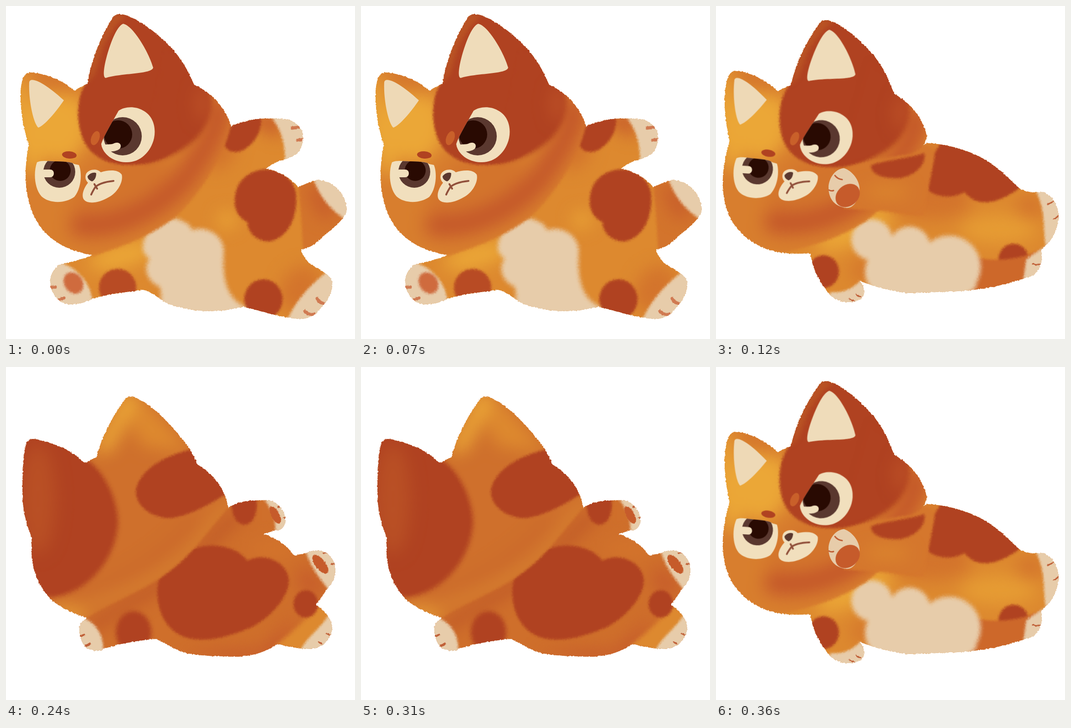
An HTML page that plays this animation: 766 by 731 pixels, repeating every 480 ms.

```html
<!DOCTYPE html>
<html lang="en">
<head>
<meta charset="utf-8">
<title>Tumbling kitten</title>
<style>
  html, body { margin: 0; width: 100%; height: 100%; overflow: hidden; background: #fff; }
  svg { display: block; width: 766px; height: 731px; }
  .pose { visibility: hidden; }
  .pose.on { visibility: visible; }
  .crisp { filter: blur(.7px); }
  .soft { filter: blur(2.5px); }
  .mid { filter: blur(5px); }
  .wash { filter: blur(18px); }
  .rust { fill: #b04221; }
  .clay { fill: #c65b2b; }
  .orange { fill: #d3742c; }
  .amber { fill: #dd892f; }
  .gold { fill: #eba737; }
  .cream { fill: #e7ccaa; }
  .ivory { fill: #f1dfbd; }
  .iris { fill: #5a382f; }
  .pupil { fill: #290a02; }
  .line { fill: none; stroke-linecap: round; stroke-linejoin: round; }
  .toes { stroke: #d07a52; stroke-width: 7; }
  .claws { stroke: #c06038; stroke-width: 3; }
</style>
</head>
<body>
<svg viewBox="0 0 766 731">
  <defs>
    <filter id="rough" filterUnits="userSpaceOnUse" x="0" y="0" width="766" height="731" color-interpolation-filters="sRGB">
      <feTurbulence type="fractalNoise" baseFrequency=".25" numOctaves="2" seed="4"/>
      <feColorMatrix values="1 0 0 0 0  0 1 0 0 0  0 0 1 0 0  0 0 0 0 1" result="noise"/>
      <feDisplacementMap in="SourceGraphic" in2="noise" scale="4" xChannelSelector="R" yChannelSelector="G"/>
    </filter>

    <path id="headOutline" d="M50 305C42 280 31 235 32 195C33 165 38 146 55 146C85 148 120 160 150 186L179 170C186 130 200 80 235 24C243 15 258 17 275 25C310 42 345 72 365 94C390 122 403 150 413 173C450 190 482 222 494 264C475 340 420 420 370 465C310 510 250 530 190 547C135 538 100 515 78 488C45 445 35 380 50 305Z"/>
    <path id="headArea" d="M510 -20V240L494 264C475 340 420 420 370 465C310 510 250 530 190 549H-40V-20Z"/>
    <path id="bigEye" d="M247 230C260 221 282 219 300 229C322 240 330 265 325 290C318 322 292 345 262 343C235 342 212 325 209 303C215 285 235 252 247 230Z"/>
    <path id="smallEye" d="M68 343C80 338 90 341 108 341C125 342 142 341 150 347L160 349C167 365 166 400 150 419C130 434 95 434 78 418C62 400 60 365 68 343Z"/>
    <clipPath id="headClip"><use href="#headArea"/></clipPath>
    <clipPath id="bigEyeClip"><use href="#bigEye"/></clipPath>
    <clipPath id="smallEyeClip"><use href="#smallEye"/></clipPath>

    <g id="head" class="soft"><g clip-path="url(#headClip)">
      <use href="#headArea" fill="#d87e2e"/>
      <g class="wash">
        <ellipse class="gold" cx="118" cy="262" rx="65" ry="80"/>
        <ellipse class="gold" cx="35" cy="235" rx="20" ry="90"/>
        <ellipse class="gold" cx="58" cy="325" rx="22" ry="50"/>
        <ellipse class="orange" cx="250" cy="400" rx="120" ry="65" transform="rotate(-30 250 400)"/>
        <ellipse class="orange" cx="108" cy="168" rx="40" ry="18" transform="rotate(35 108 168)"/>
        <path class="line" stroke="#c4582a" stroke-width="50" d="M165 482C250 490 345 440 395 375C435 320 465 270 470 225"/>
      </g>
      <path class="rust" d="M179 165C151 200 154 262 171 297C189 332 225 349 270 349C340 350 390 314 417 272C437 235 428 195 413 165L440 -10H190Z"/>
      <path class="rust mid" d="M300 345C370 335 420 300 438 262C455 230 452 205 445 165L350 100Z"/>
      <path class="mid" fill="#b95324" d="M180 170L190 90L235 15L265 20L240 45L215 85L195 150Z"/>
      <ellipse class="wash" fill="#bd5127" cx="432" cy="215" rx="16" ry="40"/>
    </g></g>

    <g id="face" class="crisp">
      <path fill="#eed9b6" d="M51 167C53 155 80 164 127 207C110 232 85 262 71 267C60 258 49 205 51 167Z"/>
      <path fill="#efdcba" d="M257 39C278 42 313 100 323 135C322 150 252 147 219 158C211 157 216 130 220 115C228 85 242 45 257 39Z"/>
      <ellipse class="rust" cx="139" cy="327" rx="16" ry="8" transform="rotate(5 139 327)"/>
      <ellipse fill="#c9602a" cx="196" cy="290" rx="9" ry="16" transform="rotate(20 196 290)"/>
      <use href="#bigEye" class="ivory"/>
      <g clip-path="url(#bigEyeClip)">
        <circle class="iris" cx="256" cy="286" r="42"/>
        <circle class="pupil" cx="246" cy="282" r="31"/>
        <path class="ivory" d="M209 308C218 301 230 306 238 301C250 297 255 306 250 313C242 320 229 321 216 316Z"/>
      </g>
      <use href="#smallEye" class="ivory"/>
      <g clip-path="url(#smallEyeClip)">
        <circle class="iris" cx="117" cy="364" r="35"/>
        <circle class="pupil" cx="119" cy="361" r="23"/>
        <rect class="ivory" x="76" y="359" width="29" height="17" rx="8"/>
      </g>
      <path class="ivory" d="M176 368C182 358 200 356 208 365C225 360 245 358 254 370C258 385 245 410 225 420C205 432 180 436 171 425C164 415 172 398 180 388C174 382 173 375 176 368Z"/>
      <path class="iris" d="M179 374C184 366 194 364 198 367C198 376 195 382 189 385C183 383 179 379 179 374Z"/>
      <path class="line" stroke="#91503b" stroke-width="4" d="M236 384C215 386 200 392 195 399C192 404 189 409 187 414M194 391L200 401"/>
    </g>

    <clipPath id="leapClip">
      <use href="#headOutline"/>
      <path d="M190 547C160 558 135 564 115 569C98 585 94 600 99 620C107 640 120 654 140 655C160 655 175 650 190 643C220 633 265 628 300 623C325 628 335 645 360 655C400 669 440 672 480 668L522 660C560 670 600 683 640 687C665 688 680 678 690 664C705 650 718 625 716 605C712 590 690 580 665 564C655 552 648 542 648 534C665 533 680 522 700 502C720 487 740 470 748 450C748 425 735 405 715 391C700 382 683 380 670 386L641 397C625 378 600 362 570 357C580 350 590 344 600 340C615 337 630 330 640 323C652 310 653 290 650 275C640 256 625 250 610 248C570 245 530 247 495 264L300 400Z"/>
    </clipPath>
    <clipPath id="reachClip">
      <use href="#headOutline" transform="matrix(.9686 .0677 -.0677 .9686 2.3 -3)"/>
      <path d="M30 297C14 350 10 400 22 440C34 487 70 515 102 530C135 544 170 545 208 543L300 400Z"/>
      <path d="M463 301C510 303 560 318 595 340C630 362 650 388 670 403C690 410 700 410 715 408C740 415 752 440 752 465C748 495 738 515 714 535C717 560 712 580 695 592C650 607 610 618 567 623C520 628 470 628 420 630C380 625 345 615 314 603C330 620 327 635 318 643C300 653 275 654 252 636C230 610 212 580 207 543L300 400Z"/>
    </clipPath>
    <clipPath id="backClip">
      <path d="M57 375C42 340 36 310 36 270C37 220 38 185 46 165C52 156 62 157 75 161C110 170 145 182 172 211L199 198C207 165 225 120 263 69C268 63 278 65 290 70C320 85 350 115 370 138C395 168 410 185 420 214C455 235 480 265 488 309L178 550C140 540 105 520 90 500C65 470 52 430 57 375Z"/>
      <path d="M488 309C505 298 525 293 545 293L575 292C600 297 615 320 613 340C610 355 600 360 592 358L565 367C595 375 620 395 632 414L660 408C680 398 705 400 718 425C728 450 722 470 708 482C700 495 690 510 680 522C700 535 716 555 716 575C710 600 695 618 665 619C640 619 615 612 596 608C580 618 560 632 510 636C470 635 430 635 400 629C370 622 350 605 328 597C290 600 250 607 214 619C205 625 190 625 175 615C162 600 158 580 163 563L178 550L300 400Z"/>
    </clipPath>
    <clipPath id="backHeadClip">
      <path id="backHeadArea" d="M500 -20V290L488 309C450 350 410 410 370 440C310 490 240 510 178 551H-40V-20Z"/>
    </clipPath>
  </defs>

  <g class="pose">
    <g filter="url(#rough)"><g clip-path="url(#leapClip)">
      <rect class="amber" width="766" height="731"/>
      <g class="wash">
        <ellipse class="gold" cx="255" cy="548" rx="75" ry="26" transform="rotate(-15 255 548)"/>
        <ellipse class="gold" cx="485" cy="470" rx="20" ry="18"/>
        <ellipse class="orange" cx="470" cy="320" rx="30" ry="45" transform="rotate(35 470 320)"/>
        <path class="clay" d="M520 235H600L605 290L570 275Z"/>
        <ellipse class="orange" cx="645" cy="620" rx="40" ry="55" transform="rotate(35 645 620)"/>
      </g>
      <path class="orange soft" d="M641 390C646 440 650 480 652 540L780 520V370Z"/>
      <path class="clay wash" d="M655 390L690 400L730 460L690 465Z"/>
      <g class="soft">
        <path class="rust" d="M474 290C470 265 485 245 500 240L560 245C562 270 550 295 530 310C510 327 478 325 474 290Z"/>
        <path class="rust" d="M502 430C502 385 530 360 575 358C612 360 640 390 637 425C638 475 610 515 574 517C550 515 530 498 530 474C512 466 502 450 502 430Z"/>
        <ellipse class="rust" cx="565" cy="644" rx="42" ry="44"/>
        <ellipse fill="#b84b24" cx="245" cy="618" rx="41" ry="41"/>
      </g>
      <path class="cream mid" d="M302 518C308 480 360 452 390 474C400 476 405 484 408 492C440 480 480 505 478 540C475 590 480 640 525 660L500 700L345 690C335 650 345 625 335 615C310 605 300 575 315 555C300 545 298 530 302 518Z"/>
      <g class="soft">
        <path class="cream" d="M578 240C602 265 614 300 612 345L665 335V235Z"/>
        <path class="cream" d="M675 380C688 420 715 450 747 470L780 440L720 365Z"/>
        <path class="cream" d="M722 570C680 600 638 640 617 690L730 710Z"/>
        <path class="cream" d="M115 562C150 572 185 600 190 650L140 680L75 640L90 570Z"/>
        <ellipse fill="#cf6b3e" cx="148" cy="608" rx="20" ry="25" transform="rotate(-35 148 608)"/>
      </g>
      <path class="line toes crisp" d="M95 617L108 617M117 644L127 641M628 268L644 266M640 295L653 293M683 642Q688 652 697 653M656 670Q664 679 676 677"/>
      <use href="#head"/>
    </g></g>
    <use href="#face"/>
  </g>

  <g class="pose">
    <g filter="url(#rough)"><g clip-path="url(#reachClip)">
      <rect class="amber" width="766" height="731"/>
      <g class="wash">
        <ellipse class="gold" cx="620" cy="490" rx="85" ry="32" opacity=".65"/>
        <ellipse class="gold" cx="310" cy="490" rx="100" ry="28" transform="rotate(-25 310 490)"/>
        <path class="orange" d="M410 310L500 300L560 420L550 455L480 470L380 455Z"/>
        <ellipse class="orange" cx="320" cy="580" rx="20" ry="28"/>
        <ellipse class="orange" cx="690" cy="440" rx="30" ry="25"/>
      </g>
      <g class="soft">
        <path class="rust" d="M498 295C468 335 455 385 466 405C488 422 525 422 545 408C570 440 610 440 668 399L640 320Z"/>
        <ellipse class="rust" cx="653" cy="556" rx="33" ry="34"/>
        <path fill="#cd682a" d="M560 550C610 562 680 562 735 518V650H550Z"/>
        <ellipse class="rust" cx="236" cy="583" rx="34" ry="36"/>
        <path class="cream" d="M252 628C275 630 300 622 316 603L345 640L290 670L245 640Z"/>
        <path class="cream" d="M697 398C724 440 718 490 723 525L770 515V395Z"/>
        <path class="cream" d="M681 556C692 548 703 540 727 525V610H673Z"/>
      </g>
      <g class="cream mid">
        <circle cx="342" cy="513" r="45"/>
        <circle cx="425" cy="529" r="45"/>
        <circle cx="512" cy="573" r="69"/>
        <circle cx="386" cy="583" r="59"/>
        <ellipse cx="462" cy="610" rx="110" ry="38"/>
      </g>
      <path class="line claws" d="M728 435Q735 433 740 429M741 467Q747 466 752 460M695 566Q704 570 713 566"/>
      <path class="line claws" d="M293 643Q297 647 303 647M308 633Q311 638 317 638"/>
      <use href="#head" transform="matrix(.9686 .0677 -.0677 .9686 2.3 -3)"/>
      <path class="soft" fill="#d5772d" d="M275 358C320 345 380 330 430 325L464 306L480 330L455 460C440 462 420 458 400 455C360 447 320 449 280 444Z"/>
      <ellipse class="amber wash" cx="375" cy="408" rx="50" ry="12"/>
      <path class="rust soft" d="M340 350C360 340 435 332 457 323C463 347 435 376 398 378C366 378 340 370 340 350Z"/>
    </g></g>
    <use href="#face" transform="matrix(.9686 .0677 -.0677 .9686 2.3 -3)"/>
    <path class="cream crisp" d="M281 356C300 362 317 385 315 405C312 430 300 445 285 443C262 440 246 425 247 395C250 372 265 357 281 356Z"/>
    <ellipse class="clay crisp" cx="289" cy="416" rx="29" ry="23" transform="rotate(-40 289 416)"/>
    <path class="line claws" d="M261 372Q267 380 277 381M248 404Q253 407 258 405"/>
  </g>

  <g class="pose" filter="url(#rough)"><g clip-path="url(#backClip)">
    <rect fill="#cf6f2b" width="766" height="731"/>
    <g class="wash">
      <path class="line" stroke="#be5727" stroke-width="24" d="M190 570C270 515 340 480 390 445C430 415 460 360 510 325"/>
      <ellipse class="orange" cx="590" cy="400" rx="55" ry="20"/>
      <path class="clay" d="M380 625L560 620L640 540L600 640L500 650Z"/>
      <path class="clay" d="M650 430L700 480L680 510L640 480Z"/>
    </g>
    <path class="amber mid" d="M685 520C660 555 620 590 590 612L670 630L740 560Z"/>
    <ellipse class="rust mid" cx="280" cy="582" rx="39" ry="46"/>
    <g class="soft">
      <path class="rust" d="M332 490C335 430 400 391 455 392C490 394 515 405 530 425C570 405 620 430 621 470C620 510 570 560 530 575C470 600 420 605 385 590C345 570 332 530 332 490Z"/>
      <path class="rust" d="M495 285H550C553 325 542 346 522 346C503 344 492 320 495 285Z"/>
      <ellipse class="rust" cx="658" cy="520" rx="27" ry="30"/>
      <path class="cream" d="M563 285C582 310 594 335 591 365L640 370L630 275Z"/>
      <path class="cream" d="M657 402C668 440 690 465 707 488L750 480L730 385Z"/>
      <path class="cream" d="M708 544C690 575 662 590 646 622L680 640L745 600Z"/>
      <path class="cream" d="M168 550C197 560 217 590 213 630L170 640L140 590Z"/>
    </g>
    <g class="clay crisp">
      <ellipse cx="591" cy="325" rx="9" ry="21" transform="rotate(-28 591 325)"/>
      <ellipse cx="690" cy="433" rx="11" ry="25" transform="rotate(-38 690 433)"/>
    </g>
    <path class="line claws" d="M597 307H602M609 331H614M696 409L706 408M714 433L722 431M704 585L712 589M687 604L693 608"/>
    <path class="line claws" style="stroke-width: 5" d="M163 591L172 588M176 612L184 608"/>
    <g class="soft"><g clip-path="url(#backHeadClip)">
      <use href="#backHeadArea" fill="#cf702c"/>
      <g class="wash">
        <path class="gold" d="M190 190L260 50L300 70L270 110L230 185Z"/>
        <path class="amber" d="M265 110L310 75L410 190L300 175Z"/>
        <path class="line" stroke="#d98530" stroke-width="18" d="M110 530C200 525 320 475 385 420C430 375 465 335 490 300"/>
        <ellipse class="gold" cx="140" cy="543" rx="45" ry="10" transform="rotate(18 140 543)"/>
        <path class="line" stroke="#c8642a" stroke-width="16" d="M140 508C230 490 350 420 410 340"/>
      </g>
      <path class="rust mid" d="M172 200C215 225 245 290 246 340C243 420 180 500 95 506L-20 500V130L120 150Z"/>
      <path class="rust" d="M165 200C212 225 238 290 239 340C235 415 175 485 105 500L-20 490V130L120 150Z"/>
      <ellipse class="wash" fill="#b95025" cx="70" cy="290" rx="38" ry="120"/>
      <path class="rust" d="M285 272C290 230 345 190 425 178L510 260C440 310 390 330 355 332C315 328 285 305 285 272Z"/>
    </g></g>
  </g></g>
</svg>
<script>
  const STEP_MS = 120;
  const order = [0, 1, 2, 1];
  const poses = document.querySelectorAll('.pose');

  function draw() {
    const current = order[Math.floor(performance.now() / STEP_MS) % order.length];
    poses.forEach((pose, i) => pose.classList.toggle('on', i === current));
    requestAnimationFrame(draw);
  }
  draw();
</script>
</body>
</html>
```
